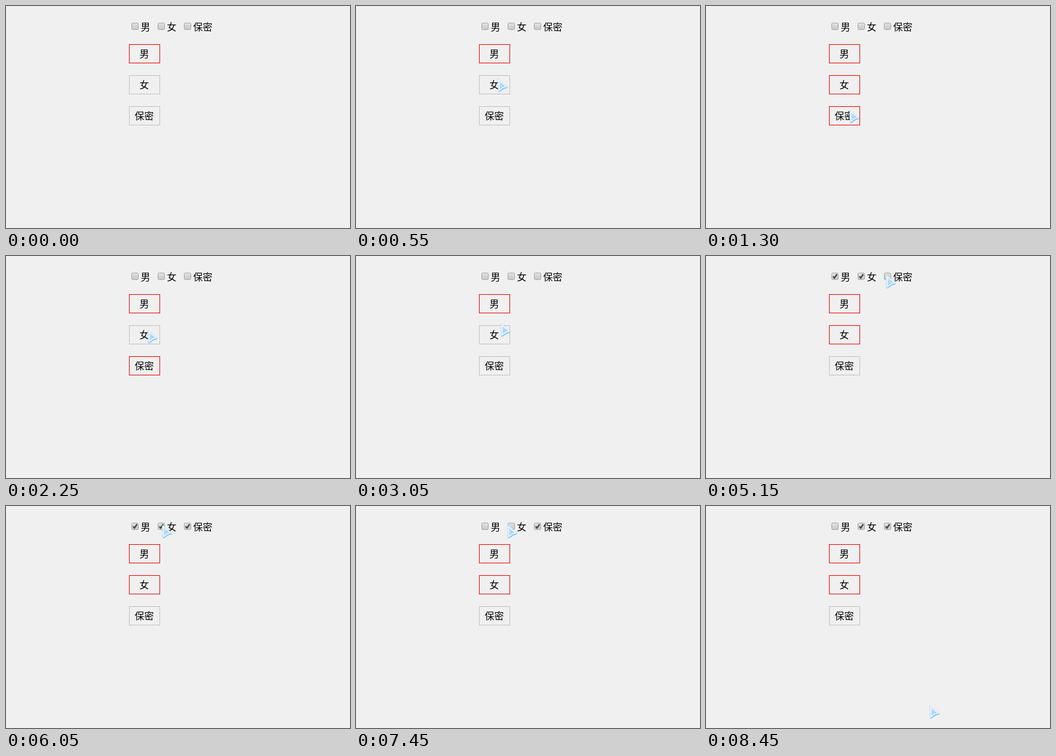
An HTML page that plays this animation: 576x372 px, repeating every 8.5 s.

```html
<!DOCTYPE html>
<html lang="zh-CN">
<head>
<meta charset="utf-8">
<title>选项</title>
<style>
  html, body { margin: 0; width: 100%; height: 100%; overflow: hidden; background: #f0f0f0; }
  svg { display: block; width: 576px; height: 372px; }
  text { font: 300 16px "Noto Sans CJK SC", "Noto Sans CJK", sans-serif; fill: #000; }
  .frame { fill: none; stroke: #c0c0c0; }
  .on .frame { stroke: #ee0000; }
  .tick { fill: none; stroke: #444; stroke-width: 2.3; visibility: hidden; }
  .on .tick { visibility: visible; }
</style>
</head>
<body>
<svg viewBox="0 0 576 372">
  <defs>
    <linearGradient id="face" x2="0" y2="1">
      <stop offset="0" stop-color="#e6e6e6"/>
      <stop offset=".45" stop-color="#d4d4d4"/>
      <stop offset="1" stop-color="#cbcbcb"/>
    </linearGradient>
    <linearGradient id="glass" x2="1" y2="1">
      <stop offset="0" stop-color="#cfe6f5"/>
      <stop offset="1" stop-color="#8fcaf2"/>
    </linearGradient>
  </defs>
  <g id="items"></g>
  <g id="cursor" stroke-linejoin="round">
    <path d="M.5 1.5L15 14L9 16L1 21.5Z" fill="#84c4f0" stroke="#b5dcf5" stroke-width="2.4"/>
    <path d="M1 2L13.6 13.2L8 14.5L1.8 19.5Z" fill="url(#glass)" stroke="#f3faff" stroke-width="1.6"/>
    <path d="M2 21.5L9 16.4L15 14.6" fill="none" stroke="#74bbed" stroke-width="1.2"/>
  </g>
</svg>
<script>
const LOOP = 8500, STEP = 50;
const labels = ["男", "女", "保密"];
const cursor = document.getElementById("cursor");
const root = document.getElementById("items");

// x and y are where the pointer rests on an item
const checks = labels.map((label, i) => {
  const left = 210 + 44 * i;
  return { x: left, y: 32, flips: [], svg:
    `<rect x="${left + .5}" y="28.5" width="11" height="11" rx="1.8" fill="url(#face)" stroke="#a4a4a4"/>
     <path class="tick" d="M${left + 2.8} 34.2l2.3 2.7l4.3 -6.4"/>
     <text x="${left + 15.5}" y="41">${label}</text>` };
});
const buttons = labels.map((label, i) => {
  const top = 64 + 52 * i;
  return { x: 238, y: top + 6, flips: i ? [] : [0], svg:
    `<rect class="frame" x="206.5" y="${top + .5}" width="51" height="31"/>
     <text x="231.5" y="${top + 22}" text-anchor="middle">${label}</text>` };
});
const items = [...checks, ...buttons];
root.innerHTML = items.map(item => `<g>${item.svg}</g>`).join("");

const [male, female, secret] = checks;
const [, womanBtn, secretBtn] = buttons;
const entry = { x: 368, y: 207 };

const trips = [];
let last = entry;
// travel between two times, stop dx beside the item's spot, then maybe click
function go(item, leave, arrive, { click, dx = 0, lift = 0 } = {}) {
  const to = { x: item.x + dx, y: item.y };
  trips.push({ from: last, to, leave, arrive, lift });
  if (click) item.flips.push(click);
  last = to;
}

go(womanBtn, 50, 500, { click: 650, lift: 45 });
go(secretBtn, 950, 1300, { click: 1300, dx: 3 });
go(womanBtn, 1600, 2050, { click: 2100 });
go(secretBtn, 2200, 2600, { click: 2850, dx: 6 });
go(womanBtn, 2850, 3200, { click: 3550, dx: 5, lift: 30 });
go(male, 3650, 4200, { click: 4350, dx: 4 });
go(female, 4350, 4550, { click: 4600 });
go(secret, 4600, 5250, { click: 5450, dx: 7 });
go(female, 5450, 6050, { click: 6300, dx: 8 });
go(male, 6300, 6750, { click: 6950, dx: 2 });
go(female, 6950, 7250);
go(female, 7450, 7600, { click: 7750, dx: 5 });
go({ x: 453, y: 269 }, 7750, 8200);
go({ x: 375, y: 334 }, 8350, 8450);

function pointAt(t) {
  const { from, to, leave, arrive, lift } = trips.findLast(trip => trip.leave <= t);
  const k = Math.min(1, (t - leave) / (arrive - leave));
  const e = k * k * (3 - 2 * k);
  return [
    from.x + (to.x - from.x) * e,
    from.y + (to.y - from.y) * e - lift * Math.sin(Math.PI * k)
  ].map(Math.round);
}

function draw(now) {
  const t = Math.floor(now % LOOP / STEP) * STEP;
  items.forEach(({ flips }, i) => {
    const on = flips.filter(f => f <= t).length % 2 === 1;
    root.children[i].classList.toggle("on", on);
  });
  cursor.style.visibility = t < STEP ? "hidden" : "visible";
  if (t >= STEP) cursor.setAttribute("transform", `translate(${pointAt(t)})`);
}

const start = performance.now();
function loop() {
  draw(performance.now() - start);
  requestAnimationFrame(loop);
}
loop();
</script>
</body>
</html>
```
